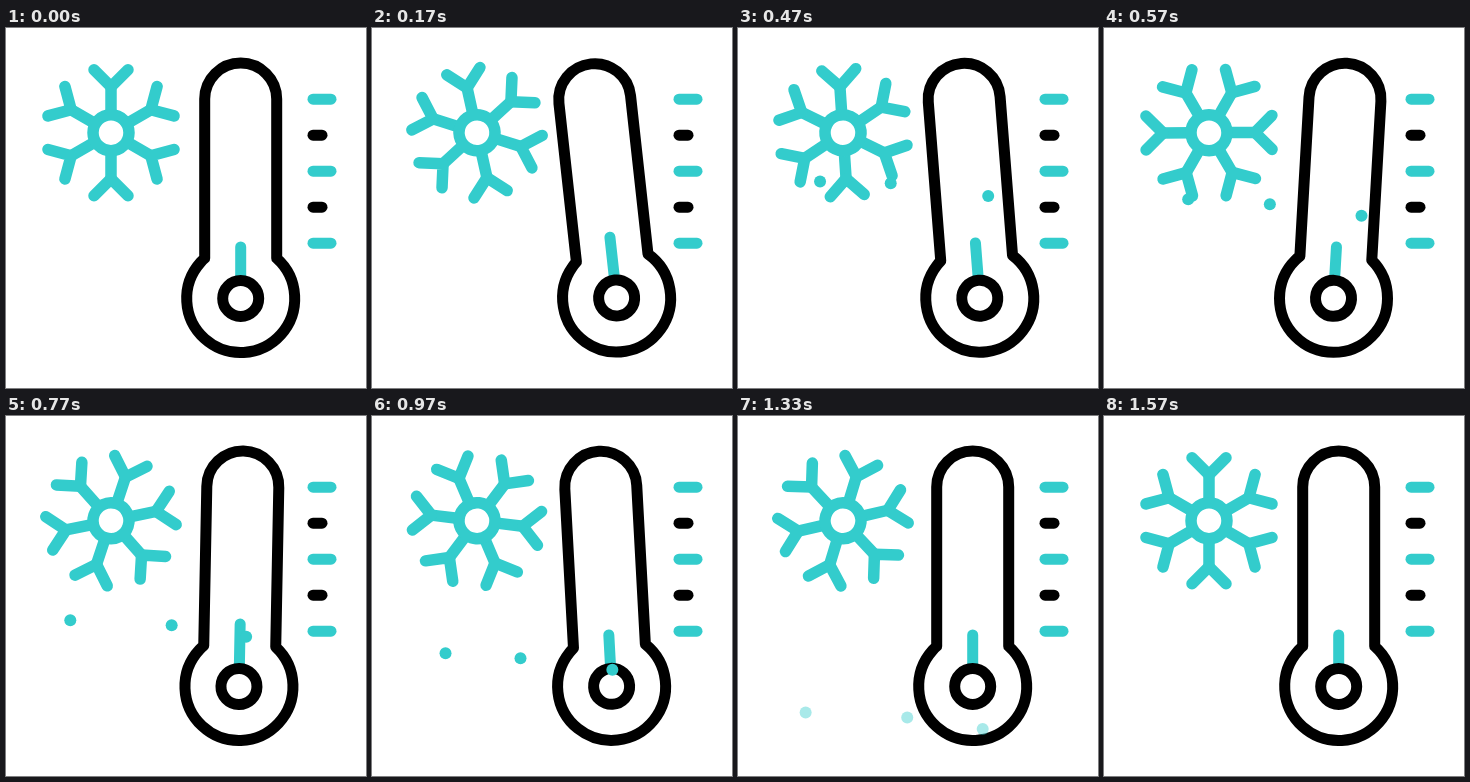
These frames come from a looping animation (360 px wide and 360 px high, 1670 ms). An HTML page with a canvas:

```html
<!DOCTYPE html>
<html lang="en">
<head>
<meta charset="utf-8">
<title>Cold weather</title>
<style>
  html, body { margin: 0; width: 100%; height: 100%; overflow: hidden; background: #fff; }
  canvas { display: block; width: 360px; height: 360px; }
</style>
</head>
<body>
<canvas id="stage"></canvas>
<script>
const LOOP = 1670, TEAL = '#33cccc', BLACK = '#000', RAD = Math.PI / 180;
const canvas = document.getElementById('stage');
const ctx = canvas.getContext('2d');
const ratio = window.devicePixelRatio || 1;
canvas.width = canvas.height = 360 * ratio;

// Key poses in degrees: [time in ms, angle].
const spin = [[0, 0], [330, -35.5], [570, -90], [770, -161.2], [970, -262.7], [1170, -320.7], [1570, -360]];
const shiver = [[0, 0], [333, -12.1], [633, 5.2], [920, -3.5], [1167, 0]];

// lag: how far above its steady fall a drop begins.
const drops = [
  { x: 74, y: 77, peak: 525, lag: 3 },
  { x: 160, y: 82, peak: 670, lag: 11 },
  { x: 246, y: 93.5, peak: 570, lag: 8 }
];

const clamp = v => Math.min(1, Math.max(0, v));

const slope = (keys, i) => (keys[i + 1][1] - keys[i][1]) / (keys[i + 1][0] - keys[i][0]);

// Flat at the ends and turning points, harmonic mean of neighbours elsewhere.
function tangent(keys, i) {
  if (i === 0 || i === keys.length - 1) return 0;
  const a = slope(keys, i - 1), b = slope(keys, i);
  return a * b <= 0 ? 0 : 2 * a * b / (a + b);
}

function sample(keys, t) {
  const last = keys.length - 1;
  if (t >= keys[last][0]) return keys[last][1];
  let i = 0;
  while (t > keys[i + 1][0]) i++;
  const [t0, v0] = keys[i], [t1, v1] = keys[i + 1];
  const span = t1 - t0, u = (t - t0) / span, r = 1 - u;
  return v0 * r * r * (1 + 2 * u) + v1 * u * u * (3 - 2 * u)
    + span * u * r * (tangent(keys, i) * r - tangent(keys, i + 1) * u);
}

const hop = (t, from, to) => Math.sin(Math.PI * clamp((t - from) / (to - from))) ** 2;

function line(color, ...points) {
  ctx.strokeStyle = color;
  ctx.beginPath();
  for (const [x, y] of points) ctx.lineTo(x, y);
  ctx.stroke();
}

function ring(x, y, color) {
  ctx.strokeStyle = color;
  ctx.fillStyle = '#fff';
  ctx.beginPath();
  ctx.arc(x, y, 18, 0, 2 * Math.PI);
  ctx.fill();
  ctx.stroke();
}

function drawSnowflake(t) {
  ctx.save();
  ctx.translate(105, 104.7);
  ctx.rotate(sample(spin, t) * RAD);
  ctx.lineWidth = 11.5;
  for (let i = 0; i < 6; i++) {
    line(TEAL, [0, -18], [0, -46]);
    line(TEAL, [-17, -63], [0, -46], [17, -63]);
    ctx.rotate(60 * RAD);
  }
  ring(0, 0, TEAL);
  ctx.restore();
}

function drawThermometer(t) {
  const bulbAngle = Math.acos(36 / 54);
  const level = 219 - 14.8 * hop(t, 0, 570) - 11 * hop(t, 570, 970);
  ctx.save();
  ctx.translate(234.7, 180);
  ctx.rotate(sample(shiver, t) * RAD);
  ctx.translate(0, -180);
  line(TEAL, [0, level], [0, 252]);
  ctx.strokeStyle = BLACK;
  ctx.beginPath();
  ctx.arc(0, 71, 36, Math.PI, 0);
  ctx.arc(0, 270.5, 54, -bulbAngle, Math.PI + bulbAngle);
  ctx.closePath();
  ctx.stroke();
  ring(0, 270.5, BLACK);
  ctx.restore();
}

function drawScale() {
  for (let i = 0; i < 5; i++) {
    const y = 71.2 + 36 * i, minor = i % 2;
    line(minor ? BLACK : TEAL, [307, y], [minor ? 316 : 325, y]);
  }
}

function drawDrops(t) {
  const early = clamp((570 - t) / 240);
  ctx.fillStyle = TEAL;
  ctx.globalAlpha = clamp((t - 210) / 120) * clamp((1480 - t) / 350);
  for (const { x, y, peak, lag } of drops) {
    const sway = 11.5 * Math.cos((t - peak) / 600 * 2 * Math.PI);
    ctx.beginPath();
    ctx.arc(x + sway - 4 * early, y + 0.165 * t - lag * early, 6, 0, 2 * Math.PI);
    ctx.fill();
  }
  ctx.globalAlpha = 1;
}

function draw(t) {
  ctx.setTransform(ratio, 0, 0, ratio, 0, 0);
  ctx.fillStyle = '#fff';
  ctx.fillRect(0, 0, 360, 360);
  ctx.lineWidth = 11;
  ctx.lineCap = ctx.lineJoin = 'round';
  drawScale();
  drawSnowflake(t);
  drawThermometer(t);
  drawDrops(t);
}

const begin = performance.now();
function tick() {
  draw((performance.now() - begin) % LOOP);
  requestAnimationFrame(tick);
}
tick();
</script>
</body>
</html>
```
